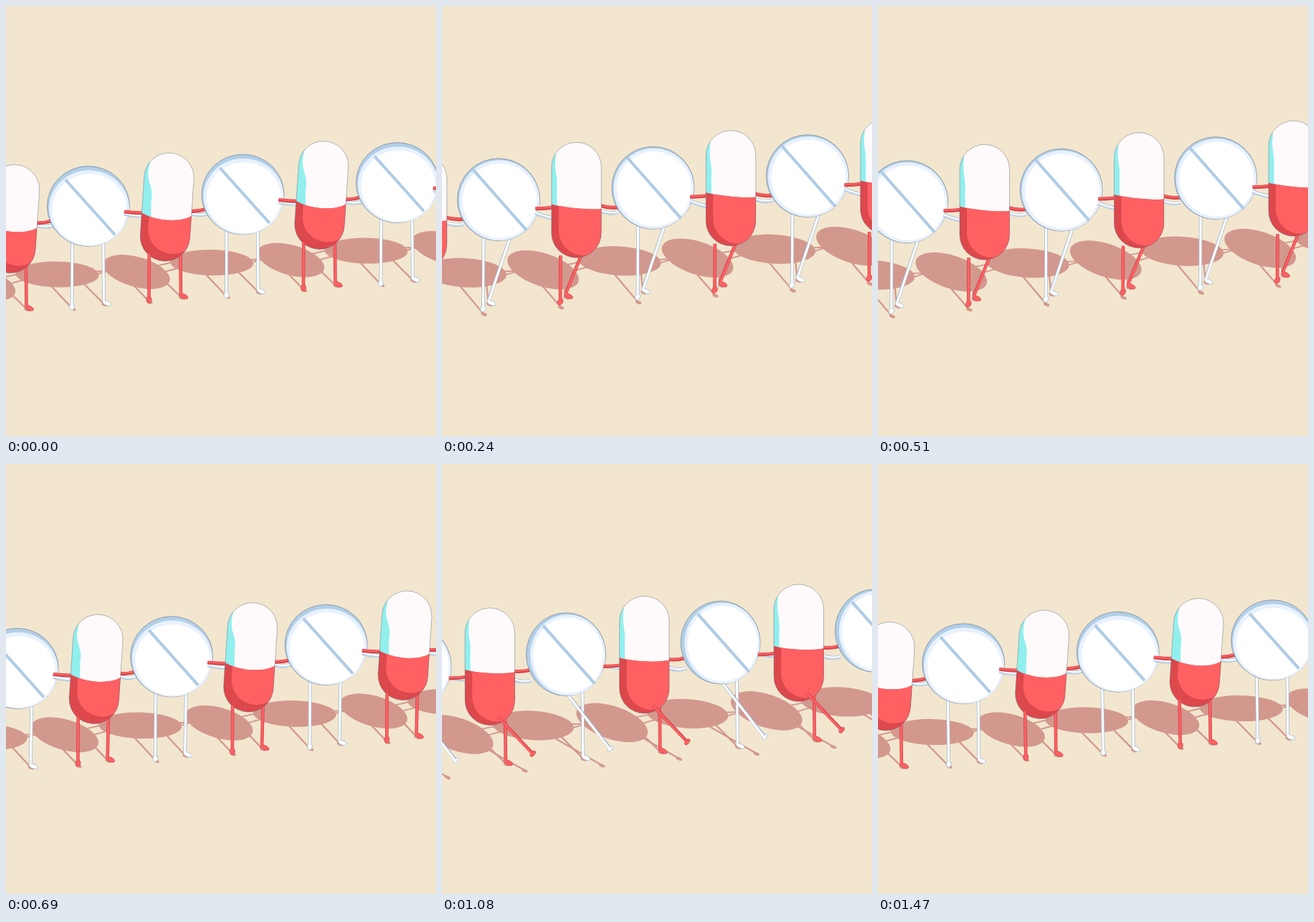
Recreate the animation shown at these times as an HTML page with a canvas. Size 600x600 px, loop 1500 ms.

```html
<!DOCTYPE html>
<html>
<head>
<meta charset="utf-8">
<style>
html, body { margin: 0; width: 100%; height: 100%; overflow: hidden; background: #f2e6cf; }
canvas { display: block; }
</style>
</head>
<body>
<canvas id="stage" width="600" height="600"></canvas>
<script>
const ctx = document.getElementById('stage').getContext('2d');
const LOOP = 1500, BEAT = 750, STEP = 30;
const GAP = { x: 215.5, y: -16.5 };
const RED = { fill: '#ff6163', edge: '#c9404a', dark: '#dc484c' };
const WHITE = { fill: '#fbfcff', edge: '#9fb6cc', dark: '#c8def3' };
const SHADOW = '#d3988d', OUTLINE = 'rgba(70,75,95,.55)';
const RADIUS = 34.7;

function ellipse(x, y, rx, ry, fill, rot = 0, edge) {
  ctx.beginPath();
  ctx.ellipse(x, y, rx, ry, rot, 0, 7);
  ctx.fillStyle = fill;
  ctx.fill();
  if (edge) {
    ctx.strokeStyle = edge;
    ctx.lineWidth = 0.8;
    ctx.stroke();
  }
}

function line(x1, y1, x2, y2, color, width, sag = 0) {
  ctx.beginPath();
  ctx.moveTo(x1, y1);
  ctx.quadraticCurveTo((x1 + x2) / 2, (y1 + y2) / 2 + sag, x2, y2);
  ctx.strokeStyle = color;
  ctx.lineWidth = width;
  ctx.stroke();
}

function capsule(top, bottom, dx = 0, dy = 0) {
  const a = Math.atan2(bottom.y - top.y, bottom.x - top.x);
  ctx.beginPath();
  ctx.arc(top.x + dx, top.y + RADIUS + dy, RADIUS, a + Math.PI / 2, a - Math.PI / 2);
  ctx.arc(bottom.x + dx, bottom.y - RADIUS + dy, RADIUS, a - Math.PI / 2, a + Math.PI / 2);
  ctx.closePath();
}

function arm(x1, y1, x2, y2, skin, sag) {
  line(x1, y1, x2, y2, skin.edge, 5, sag);
  line(x1, y1, x2, y2, skin.dark, 3.8, sag);
  line(x1, y1 - 0.8, x2, y2 - 0.8, skin.fill, 2, sag);
}

// The body straightens up later than it rises.
function pose(t) {
  const h = t % BEAT, second = t >= BEAT ? 1 : 0;
  const e = Math.min(1, Math.min(h, BEAT - h) / 250);
  const lift = e * e * (3 - 2 * e), upright = lift ** 4;
  const swing = Math.sin(Math.PI * h / BEAT);
  return { lift, upright, turn: second * upright, left: second * swing ** 1.7, right: (1 - second) * swing ** 2 };
}

// Leg positions are shared by both figures, apart from the offsets.
function legs(p, dx, hipY, ankleDy) {
  const hop = 5 * p.lift;
  return [
    { hip: { x: 243 + dx, y: hipY }, ankle: { x: 244 - 52 * p.right + dx, y: 398 - 4 * p.right + ankleDy },
      drop: 8, kick: 0, side: 1 },
    { hip: { x: 200 + 4 * p.left + dx, y: hipY }, ankle: { x: 199.5 + 84 * p.left + dx, y: 404 - 13 * p.left + ankleDy },
      drop: p.left ? 8 + 16 * p.left : 8 + hop, kick: p.left, side: 0 }
  ];
}

function legShadow({ hip, ankle, drop, kick, side }, dy) {
  const x = ankle.x - 12 * kick, y = ankle.y + drop;
  line(hip.x - 40, (side ? 366 : 371 - 16 * kick) + dy, x, y, SHADOW, 2.3);
  ellipse(x + 1, y + 1, 4.5, 2.2, SHADOW, 0.4);
}

function leg({ hip, ankle, kick, side }, skin, from, p) {
  const sx = hip.x + (ankle.x - hip.x) * from, sy = hip.y + (ankle.y - hip.y) * from;
  const bend = Math.min(1, kick * 1.5);
  if (side) ellipse(ankle.x + 4, ankle.y + 7, 6.3, 3.1, skin.fill, 0.42, skin.edge);
  else ellipse(ankle.x + bend, ankle.y + 6 - 5 * bend, 3.5 - bend, 4.8, skin.fill, kick ? 0.7 * bend : 0.5 * p.lift, skin.edge);
  const end = ankle.y + 4 * (1 - bend);
  line(sx, sy, ankle.x, end, skin.edge, 4.6);
  line(sx, sy, ankle.x, end + 1, skin.fill, 3.2);
}

function shadows(p, pillLegs, tabletLegs) {
  const s = p.lift;
  pillLegs.forEach(l => legShadow(l, 0));
  tabletLegs.forEach(l => legShadow(l, -8));
  line(205, 364 - 5 * s, 255, 352 - 3 * s, SHADOW, 2);
  line(210, 374 - 5 * s, 250, 363 - 5 * s, SHADOW, 2);
  line(325, 363 - 3 * s, 385, 345 - 3 * s, SHADOW, 2);
  line(320, 355 - 3 * s, 380, 352 - 3 * s, SHADOW, 2);
  ellipse(182 - 6.5 * s + 1.5 * p.turn, 371 - 5.5 * s, 48 + 4 * s, 21 + 2 * s, SHADOW, 0.27 + 0.05 * s);
  ellipse(287 - 5 * s, 358 - 5 * s, 58 - p.turn, 18 + 2.3 * s, SHADOW, 0.02 + 0.04 * s);
}

function arms({ lift: s, turn: w }) {
  arm(280, 290 - 5 * s + 5 * w, 254, 288 - 6 * s + 6 * w, WHITE, 5);
  arm(254, 286 - 10.5 * s + 1.5 * w, 280, 283 - 5 * s - 3 * w, RED, 3);
  arm(165, 290 - 4 * s, 193, 293 + s - 5 * w, WHITE, 2);
  arm(193, 289 - 11 * s + 7 * w, 165, 287 - 7 * s + 7 * w, RED, 1);
}

function pill({ lift: s, upright: u, turn: w }) {
  const top = { x: 227.5 - 5.5 * u, y: 205 - 17.5 * s + 1.5 * w };
  const bottom = { x: 222, y: 356 - 7.5 * s + 4 * w };
  const seam = top.y + 83 + 6 * u - 3 * w, bow = 14 - 10 * u + 2 * w;
  const seamL = seam - 3 + 2 * w, seamR = seam + 3 - w;

  ctx.save();
  capsule(top, bottom);
  ctx.clip();
  ctx.fillStyle = '#fefafb';
  ctx.fillRect(150, 150, 150, 250);

  const x = top.x - RADIUS;
  ctx.beginPath();
  ctx.moveTo(x - 8, top.y + 8);
  ctx.lineTo(x + 9 - 3 * u, top.y + 10 + 8 * u);
  ctx.bezierCurveTo(x + 3 * u, top.y + 42, x + 12 - 4 * u, top.y + 40, x + 10.5 - 3 * u, top.y + 62);
  ctx.quadraticCurveTo(x + 9 - 2 * u, top.y + 72, x + 10 - 2 * u, seam + 12);
  ctx.lineTo(x - 10, seam + 12);
  ctx.fillStyle = '#91efee';
  ctx.fill();

  ctx.beginPath();
  ctx.moveTo(185, seamL);
  ctx.bezierCurveTo(200, seamL + bow, 244, seamR + bow, 262, seamR);
  ctx.lineTo(270, 400);
  ctx.lineTo(170, 400);
  ctx.closePath();
  ctx.clip();
  ctx.fillStyle = RED.dark;
  ctx.fillRect(150, 150, 150, 250);
  capsule(top, bottom, 11 - u, -10 + 7 * u - 2 * w);
  ctx.fillStyle = RED.fill;
  ctx.fill();
  ctx.restore();

  capsule(top, bottom);
  ctx.strokeStyle = OUTLINE;
  ctx.lineWidth = 0.7;
  ctx.stroke();
}

function tablet({ lift: s, upright: u, turn: w }) {
  const x = 330.5 - 1.5 * s - 0.8 * w, y = 263 - 12 * s + 2.7 * w;
  const rx = 57.5 - 2 * w, ry = 56 + 1.5 * s + 0.4 * w;
  ellipse(x, y, rx, ry, '#b1cfe8', 0, OUTLINE);
  ellipse(x + 1 + 1.5 * w, y + 2.7 - 1.7 * u, rx - 1.5 - 1.5 * w, ry - 3 + 1.5 * u, '#e8f1fe');
  ellipse(x + 1.5 + 1.5 * w, y + 4.5 - 3 * u, rx - 5.5 - w, ry - 6.5 + u, '#ffffff');
  const x1 = x - 32 - 4 * u + 4 * w, y1 = y - 37 - 5 * u + 2 * w;
  const x2 = x + 37 + 2 * u + w, y2 = y + 40 + 3 * u - 2 * w;
  line(x1, y1, x2, y2, '#b2cee8', 4);
  line(x1 + 1, y1 - 1, x2 + 1, y2 - 1, '#98bad9', 0.8);
}

function draw(t) {
  const p = pose(t), f = t / LOOP;
  const pillLegs = legs(p, 0, 310, 0), tabletLegs = legs(p, 108, 286, -7);
  const each = paint => {
    for (let i = -2; i <= 4; i++) {
      ctx.save();
      ctx.translate(GAP.x * (i - f), GAP.y * (i - f));
      paint();
      ctx.restore();
    }
  };
  ctx.fillStyle = '#f2e6cf';
  ctx.fillRect(0, 0, 600, 600);
  each(() => shadows(p, pillLegs, tabletLegs));
  each(() => {
    arms(p);
    leg(pillLegs[0], RED, 0, p);
    leg(tabletLegs[0], WHITE, 0, p);
    leg(tabletLegs[1], WHITE, 0, p);
    pill(p);
    tablet(p);
    leg(pillLegs[1], RED, 0.38, p);
  });
}

function tick() {
  draw(Math.floor(performance.now() % LOOP / STEP) * STEP);
  requestAnimationFrame(tick);
}
tick();
</script>
</body>
</html>
```
